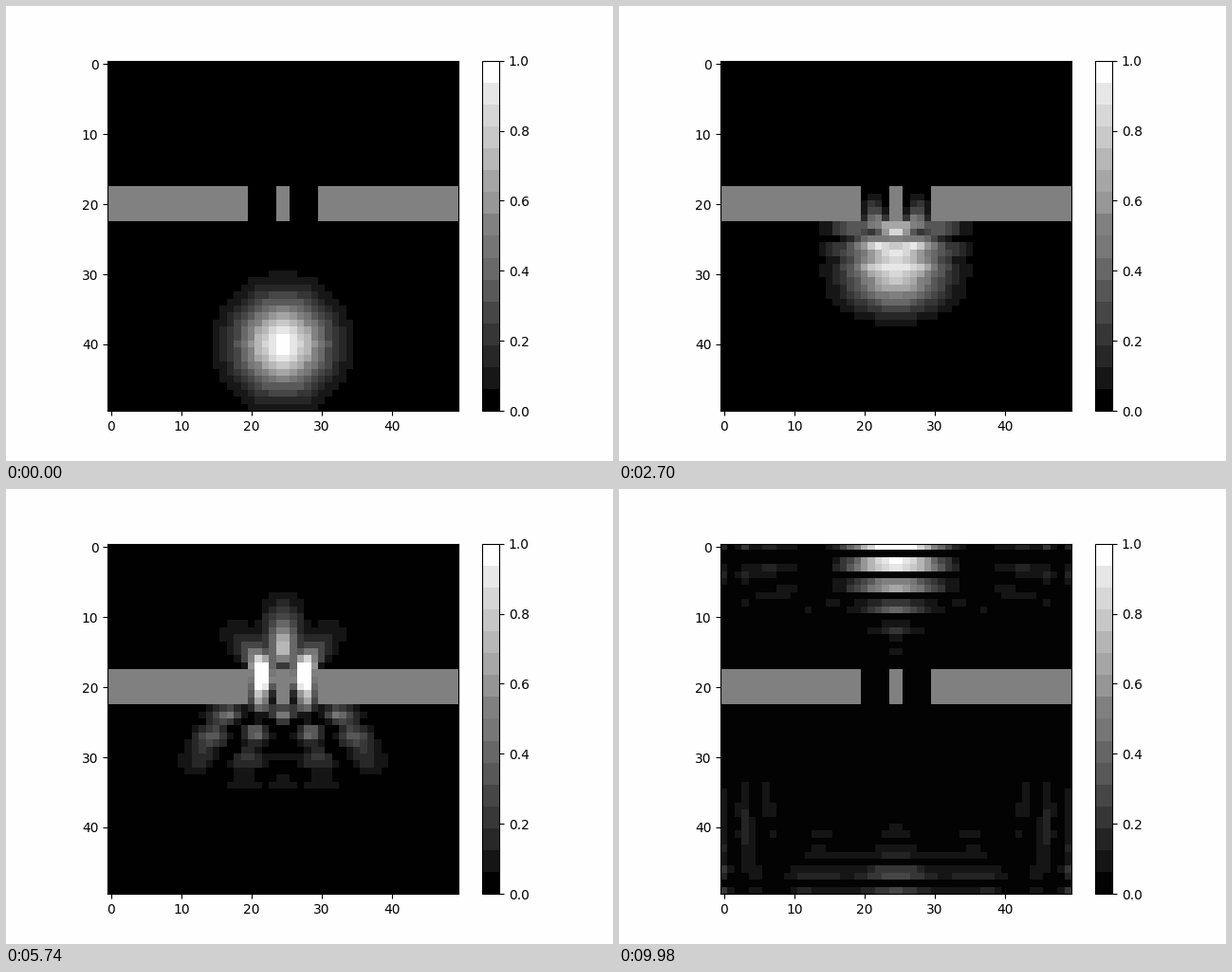
Write a matplotlib script that moves like this. It is 640 px wide and 480 px high and loops after 10000 ms.

```python
"""Wave packet passing a double slit, drawn as a probability map in 16 greys."""
import numpy as np
import matplotlib.pyplot as plt
from matplotlib.animation import FuncAnimation
from matplotlib.cm import ScalarMappable
from matplotlib.colors import ListedColormap, Normalize

N = 50
FRAMES, INTERVAL = 500, 20
DT = 0.1                    # time per frame, in units of m * cell^2 / hbar
WAVE_K = np.pi / 3          # upward wave number per cell
WIDTH2 = 37.5               # squared packet width
PEAK = 0.985
CENTRE = (40, 24.5)         # row, column
LEVELS = 16
PAGE_GREY = 254

# Pixel areas used when averaging the greys of one level
CELL_AREA, BAR_AREA = 54.6, 26.7
PAGE_AREA, LINE_AREA = 163000, 3000


def make_wall():
    wall = np.zeros((N, N), bool)
    wall[18:23] = True
    wall[18:23, 20:24] = False
    wall[18:23, 26:30] = False
    return wall


def laplacian(psi):
    p = np.pad(psi, 1, mode="edge")
    return p[:-2, 1:-1] + p[2:, 1:-1] + p[1:-1, :-2] + p[1:-1, 2:] - 4 * psi


def advance(psi, free):
    """One time step of the free Schroedinger equation, by Taylor series."""
    term = total = psi
    for n in range(1, 8):
        term = 0.5j * DT / n * laplacian(term) * free
        total = total + term
    return total


def simulate():
    wall = make_wall()
    free = ~wall
    row, col = np.mgrid[:N, :N]
    r2 = (row - CENTRE[0]) ** 2 + (col - CENTRE[1]) ** 2
    psi = np.sqrt(PEAK) * np.exp(-r2 / (2 * WIDTH2) - 1j * WAVE_K * row) * free
    maps = []
    for _ in range(FRAMES):
        maps.append(np.where(wall, 0.5, np.abs(psi) ** 2))
        psi = advance(psi, free)
    return maps


def level_greys(density):
    """Mean grey of every level over the whole picture."""
    cells = np.minimum(density.ravel() * 256, 255).astype(int)
    area = np.bincount(cells, minlength=256) * CELL_AREA + BAR_AREA
    area[0] += LINE_AREA
    area[255] += PAGE_AREA
    weighted = (area * np.arange(256)).reshape(LEVELS, -1).sum(axis=1)
    return np.floor(weighted / area.reshape(LEVELS, -1).sum(axis=1))


def grey_map(density):
    greys = level_greys(density) / 255
    return ListedColormap(np.repeat(greys[:, None], 3, axis=1))


maps = simulate()
cmaps = [grey_map(m) for m in maps]

page = (PAGE_GREY / 255,) * 3
fig, ax = plt.subplots(figsize=(6.4, 4.8), dpi=100, facecolor=page)
norm = Normalize(0, 1)
image = ax.imshow(maps[0], cmap=cmaps[0], norm=norm)
bar = fig.colorbar(ScalarMappable(norm, cmaps[0]), ax=ax)


def update(i):
    image.set_data(maps[i])
    image.set_cmap(cmaps[i])
    bar.solids.set_cmap(cmaps[i])
    return image, bar.solids


anim = FuncAnimation(fig, update, frames=FRAMES, interval=INTERVAL,
                     repeat=True, repeat_delay=0)
plt.show()
```
